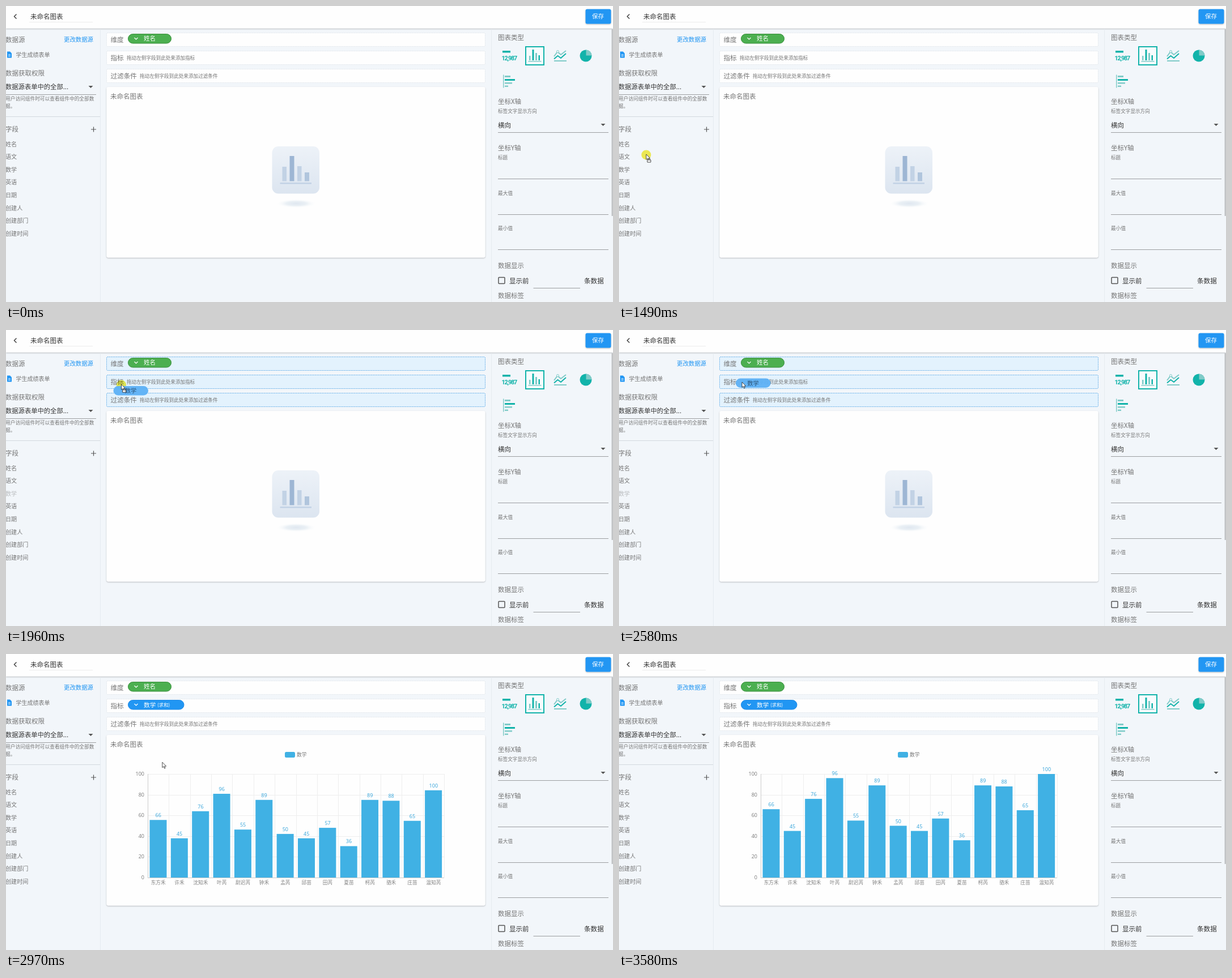
Write an HTML page that moves like this. It is 1071 px wide and 523 px high and loops after 4.67 s.

```html
<!DOCTYPE html>
<html lang="zh-CN">
<head>
<meta charset="utf-8">
<title>未命名图表</title>
<style>
html, body { margin: 0; width: 100%; height: 100%; overflow: hidden; background: #f2f6fa; }
svg { display: block; width: 1071px; height: 523px; }
text { font-family: "Noto Sans CJK SC", "Noto Sans CJK", "Noto Sans", sans-serif; white-space: pre; }
.num { font-family: "Noto Sans", "Open Sans", sans-serif; }
.counter { font: 700 10.8px Roboto, sans-serif; letter-spacing: -1.2px; }
.zone { fill: #fefefe; stroke: #e3e8ed; stroke-dasharray: 2 1; }
.drag .zone { fill: #e3f2fd; stroke: #6fb4ea; }
.drag #field2 { opacity: .45; }
.rule { stroke: #9c9ea0; }
.teal { fill: #12b3aa; }
.pale { fill: #80cbc8; }
.line { fill: none; stroke-width: 2; }
#spot { mix-blend-mode: multiply; }
</style>
</head>
<body>
<svg id="stage" viewBox="0 0 1071 523">
  <defs>
    <linearGradient id="tile" x2="0" y2="1"><stop stop-color="#edf2f8"/><stop offset="1" stop-color="#dce5f0"/></linearGradient>
    <radialGradient id="glow"><stop stop-color="#dfe7f0"/><stop offset=".5" stop-color="#eaf0f5"/><stop offset="1" stop-color="#fff" stop-opacity="0"/></radialGradient>
    <filter id="soft" x="-5%" y="-20%" width="110%" height="150%"><feDropShadow dx="0" dy="1" stdDeviation="1" flood-opacity=".28"/></filter>
  </defs>
  <rect width="1071" height="523" fill="#f2f6fa"/>
  <rect width="1071" height="39.5" fill="#fefefe" filter="url(#soft)"/>
  <path d="M18.5 14.5L14.5 18.5L18.5 22.5" fill="none" stroke="#444" stroke-width="1.5"/>
  <path d="M41 28.5H153" stroke="#ececec"/>
  <rect x="1022.500" y="5.500" width="45" height="26" rx="3" fill="#2196f3" filter="url(#soft)"/>

  <!-- side panels -->
  <path d="M166.500 41V523M856.500 41V523" stroke="#e6ebf0"/>
  <path d="M0 195.500H166" stroke="#d3d9df"/>
  <path d="M2 80.500H7L10 83.500V91.500H2Z" fill="#2196f3"/>
  <path d="M4 86H8M4 88.500H8" stroke="#fff"/>
  <path d="M150 218H159M154.500 213.500V222.500" stroke="#555" stroke-width="1.200"/>
  <path d="M145.500 141H153.500L149.500 145ZM1049.500 208H1057.500L1053.500 212Z" fill="#555"/>
  <path class="rule" d="M0 156.500H159M868 223.500H1063M868 305.500H1063M868 368.500H1063M868 430.500H1063M930.500 498.500H1013"/>
  <rect x="869" y="479.500" width="11" height="11" rx="1" fill="none" stroke="#555" stroke-width="1.500"/>
  <rect x="1068.500" y="41" width="2.500" height="330" fill="#c1c3c5"/>

  <!-- chart types -->
  <path class="teal" d="M876 79H890V82.500H876Z"/>
  <text class="counter teal" x="874.500" y="96">12,987</text>
  <rect x="917" y="72" width="32" height="32" fill="#f8fbfd" stroke="#12b3aa" stroke-width="2"/>
  <path class="pale" d="M923 88H925.500V96H923ZM934 83H937V96H934ZM921.500 97H944.500V98.500H921.500Z"/>
  <path class="teal" d="M928.500 77H931.500V96H928.500ZM939.500 87H942V96H939.500Z"/>
  <path class="line" stroke="#80cbc8" d="M967 89L973 81L979 86L988 79M967 97H989"/>
  <circle cx="973.500" cy="80.500" r="2" fill="#f2f6fa" stroke="#80cbc8"/>
  <path class="line" stroke="#12b3aa" d="M967 93.500L973.500 88L979 92L988 84"/>
  <circle class="teal" cx="1023" cy="88" r="10.500"/>
  <path class="pale" d="M1023.500 87.500V77.500A10 10 0 0 1 1033.500 87.500Z"/>
  <path class="pale" d="M877 121.500H878.500V144.500H877ZM880 123H890V126H880ZM880 135H893V137.500H880ZM880 140.500H886V143H880Z"/>
  <path class="teal" d="M880 129H898V132H880Z"/>

  <!-- middle column -->
  <rect class="zone" x="177.500" y="47.500" width="668" height="24" rx="1.500"/>
  <rect class="zone" x="177.500" y="79.500" width="668" height="24" rx="1.500"/>
  <rect class="zone" x="177.500" y="111.500" width="668" height="24" rx="1.500"/>
  <rect x="177.500" y="143" width="668" height="301.500" rx="3" fill="#fefefe" filter="url(#soft)"/>
  <rect x="215.500" y="49.500" width="76" height="16.500" rx="8.250" fill="#4caf50" stroke="#388e3c"/>
  <path d="M226.500 56L229.500 59L232.500 56" fill="none" stroke="#fff" stroke-width="1.200"/>
  <g id="labels"></g>

  <g id="empty">
    <rect x="469.500" y="248" width="83.500" height="83.500" rx="11" fill="url(#tile)"/>
    <path d="M487.500 284H495V309.500H487.500ZM514 283H521.500V309.500H514ZM483.500 312H539V314.500H483.500Z" fill="#c2d2e5"/>
    <path d="M500.500 265H508.500V309.500H500.500Z" fill="#9db6d4"/>
    <path d="M527 294H535V309.500H527Z" fill="#b0c5dd"/>
    <ellipse cx="512" cy="349" rx="36" ry="8" fill="url(#glow)"/>
  </g>
  <g id="hint"></g>
  <g id="chart">
    <rect x="215.500" y="81.500" width="98.500" height="16.500" rx="8.250" fill="#2196f3" stroke="#1e88e5"/>
    <path d="M226.500 88L229.500 91L232.500 88" fill="none" stroke="#fff" stroke-width="1.200"/>
    <rect x="492" y="173" width="18" height="10" rx="2.500" fill="#40b1e4"/>
  </g>

  <circle id="spot" r="8.500" cy="1" fill="#f7ee34"/>
  <g id="ghost">
    <rect width="61.500" height="16.500" rx="8.250" fill="#5db1f6" opacity=".95"/>
  </g>
  <g id="cursor" stroke-linejoin="round">
    <path id="arrow" d="M0 0V9.500L2.200 7.500L3.800 11L5.300 10.300L3.800 7H6.800Z" fill="#fff" stroke="#222" stroke-width=".8"/>
    <path id="parcel" d="M2 10H8V14H2ZM3.500 10V8H6.500V10" fill="#fff" stroke="#333" stroke-width=".9"/>
    <path id="move" d="M0 -6L2 -3.500H.6V-.6H3V-2L5.500 0L3 2V.6H.6V3.500H2L0 6L-2 3.500H-.6V.6H-3V2L-5.500 0L-3 -2V-.6H-.6V-3.500H-2Z" fill="#222" stroke="#fff" stroke-width=".5"/>
    <path id="hand" d="M-1 1Q0 -.6 1 1V5.500L5 6.300Q6.200 6.700 6 8.500L5 13.500H-.5L-3.800 9Q-3.500 7.200 -1 9Z" fill="#fff" stroke="#222" stroke-width=".9"/>
  </g>
</svg>
<script>
const LOOP = 4670;
const $ = id => document.getElementById(id);

function add(parent, tag, attrs, content) {
  const el = document.createElementNS('http://www.w3.org/2000/svg', tag);
  for (const k in attrs) el.setAttribute(k, attrs[k]);
  if (content !== undefined) el.textContent = content;
  return parent.appendChild(el);
}

// Text placed by its vertical centre
function label(parent, x, cy, size, content, fill = '#757575', extra = {}) {
  return add(parent, 'text', { x, y: cy + size * .38, 'font-size': size, fill, ...extra }, content);
}

const bold = { 'font-weight': 500 };
const middle = { 'text-anchor': 'middle' };
const dark = '#333';

const texts = [
  [43, 18.5, 11.5, '未命名图表', dark],
  [1034, 18.5, 10.5, '保存', '#fff', bold],
  [-1, 59.5, 11.5, '数据源'],
  [102, 59.5, 10.4, '更改数据源', '#2196f3'],
  [17.5, 86.5, 10, '学生成绩表单'],
  [-1, 119, 11.5, '数据获取权限'],
  [-1, 142.5, 11.3, '数据源表单中的全部...', dark],
  [-1, 163.5, 8.7, '用户访问组件时可以查看组件中的全部数'],
  [-1, 177, 8.7, '据。'],
  [-1, 218, 11.5, '字段'],
  [184.5, 59.5, 11.6, '维度'],
  [184.5, 91.5, 11.6, '指标'],
  [184.5, 123.5, 11.6, '过滤条件'],
  [236, 124, 8.6, '拖动左侧字段到此处来添加过滤条件'],
  [184, 160, 11.5, '未命名图表'],
  [243, 57.5, 10.5, '姓名', '#fff', bold],
  [868, 55.5, 11.5, '图表类型'],
  [868, 168.5, 11.5, '坐标X轴'],
  [868, 185.5, 8.6, '标签文字显示方向'],
  [868, 210.5, 11.4, '横向', dark],
  [868, 251, 11.5, '坐标Y轴'],
  [868, 268, 8.6, '标题'],
  [868, 330.5, 8.7, '最大值'],
  [868, 393, 8.7, '最小值'],
  [868, 458.5, 11.5, '数据显示'],
  [888, 485.5, 11.5, '显示前', dark],
  [1020, 485.5, 11.6, '条数据', dark],
  [868, 511.5, 11.5, '数据标签'],
];
texts.forEach(row => label($('labels'), ...row));

['姓名', '语文', '数学', '英语', '日期', '创建人', '创建部门', '创建时间'].forEach((name, i) =>
  label($('labels'), -1, 244 + 22.55 * i, 10.1, name, '#757575', { id: 'field' + i }));
label($('hint'), 213, 92, 8.6, '拖动左侧字段到此处来添加指标');
label($('ghost'), 30.5, 8.5, 10.3, '数学', '#2b5378', middle);

// Bar chart
const chart = $('chart');
const LEFT = 250, BASE = 395, HEIGHT = 183, SLOT = 523 / 14;
const names = ['东方禾', '许禾', '沈知禾', '叶芮', '尉迟芮', '钟禾', '孟芮', '邱苗', '田芮', '夏苗', '柯芮', '骆禾', '庄苗', '温知芮'];
const scores = [66, 45, 76, 96, 55, 89, 50, 45, 57, 36, 89, 88, 65, 100];

label(chart, 243, 89.5, 10.7, '数学', '#fff', bold);
label(chart, 267, 90, 8.4, '(求和)', '#fff', bold);
label(chart, 513, 178, 8.7, '数学');
for (let v = 0; v <= 100; v += 20) {
  const y = Math.round(BASE - v / 100 * HEIGHT) + .5;
  add(chart, 'path', { d: `M${LEFT} ${y}H773`, stroke: v ? '#eeeeee' : '#cccccc' });
  label(chart, 244, y - .7, 9, v, '#808080', { class: 'num', 'text-anchor': 'end' });
}
for (let i = 0; i <= 14; i++) {
  const x = Math.round(LEFT + i * SLOT) + .5;
  add(chart, 'path', { d: `M${x} 212V395`, stroke: i ? '#eeeeee' : '#cccccc' });
}
const bars = scores.map((score, i) => {
  const x = LEFT + (i + .5) * SLOT;
  label(chart, x, 404, 8.7, names[i], '#808080', middle);
  return {
    score,
    rect: add(chart, 'rect', { x: x - 15.2, width: 30, fill: '#40b1e4' }),
    value: label(chart, x, 0, 9, score, '#40a9dc', { class: 'num', ...middle }),
  };
});

// Screen refreshes: start, end, count of each burst
const bursts = [[290, 780, 7], [850, 930, 2], [1400, 1880, 7], [1960, 2110, 3], [2340, 2580, 4], [2740, 3210, 7], [3290, 3580, 5]];
const ticks = [0, ...bursts.flatMap(([a, b, n]) =>
  Array.from({ length: n }, (_, i) => Math.floor((a + (b - a) * i / (n - 1)) / 10) * 10))];

// Tracks: [time, x, y]
const pointer = [[290, 1013, 498], [370, 720, 445], [450, 410, 390], [530, 190, 340], [610, 80, 310], [690, 25, 293], [780, 10, 288],
  [930, 10, 288], [1400, 22, 281], [1480, 48, 262], [1880, 197, 112], [1960, 203.5, 96], [2110, 213, 89], [2340, 214, 90],
  [2580, 217, 92], [2810, 217, 92], [3210, 364, 340], [3290, 373, 351.5], [3500, 822, 507]];
const parcel = [[1560, 63, 240], [1880, 182, 115], [1960, 189.5, 99], [2110, 202, 84], [2580, 206, 85.5]];

function at(track, t) {
  const i = track.findIndex(p => p[0] > t);
  if (i < 0) return track[track.length - 1].slice(1);
  if (i === 0) return track[0].slice(1);
  const [a, b] = [track[i - 1], track[i]];
  const k = (t - a[0]) / (b[0] - a[0]);
  return [a[1] + (b[1] - a[1]) * k, a[2] + (b[2] - a[2]) * k];
}

const show = (id, on) => $(id).setAttribute('display', on ? 'inline' : 'none');
const place = (id, pos) => $(id).setAttribute('transform', `translate(${pos})`);

function draw(time) {
  const t = ticks.filter(k => k <= time).pop();
  const dragging = t >= 1560 && t < 2740;
  const dropped = t >= 2740;
  $('stage').classList.toggle('drag', dragging);
  show('empty', !dropped);
  show('hint', !dropped);
  show('chart', dropped);
  show('ghost', dragging);
  place('ghost', at(parcel, t));

  const pos = at(pointer, t);
  place('cursor', pos);
  place('spot', pos);
  const glow = t < 850 ? 0 : t < 930 ? .45 : t < 2340 ? .85 : t < 2420 ? .5 : t < 2500 ? .2 : 0;
  $('spot').setAttribute('opacity', glow);

  const moving = t >= 780 && t < 1400;
  const pointing = t >= 3130 && t < 3350;
  show('cursor', t >= 290 && t < 3580);
  show('arrow', !moving && !pointing);
  show('move', moving);
  show('hand', pointing);
  show('parcel', t >= 1400 && t < 2340);

  const p = Math.min(1, Math.max(0, (t - 2740) / 500));
  const grow = 1 - (1 - p) ** 3;
  for (const { score, rect, value } of bars) {
    const h = score / 100 * HEIGHT * grow;
    rect.setAttribute('y', BASE - h);
    rect.setAttribute('height', h);
    value.setAttribute('y', BASE - h - 5);
  }
}

const start = performance.now();
function frame() {
  draw((performance.now() - start) % LOOP);
  requestAnimationFrame(frame);
}
frame();
</script>
</body>
</html>
```
